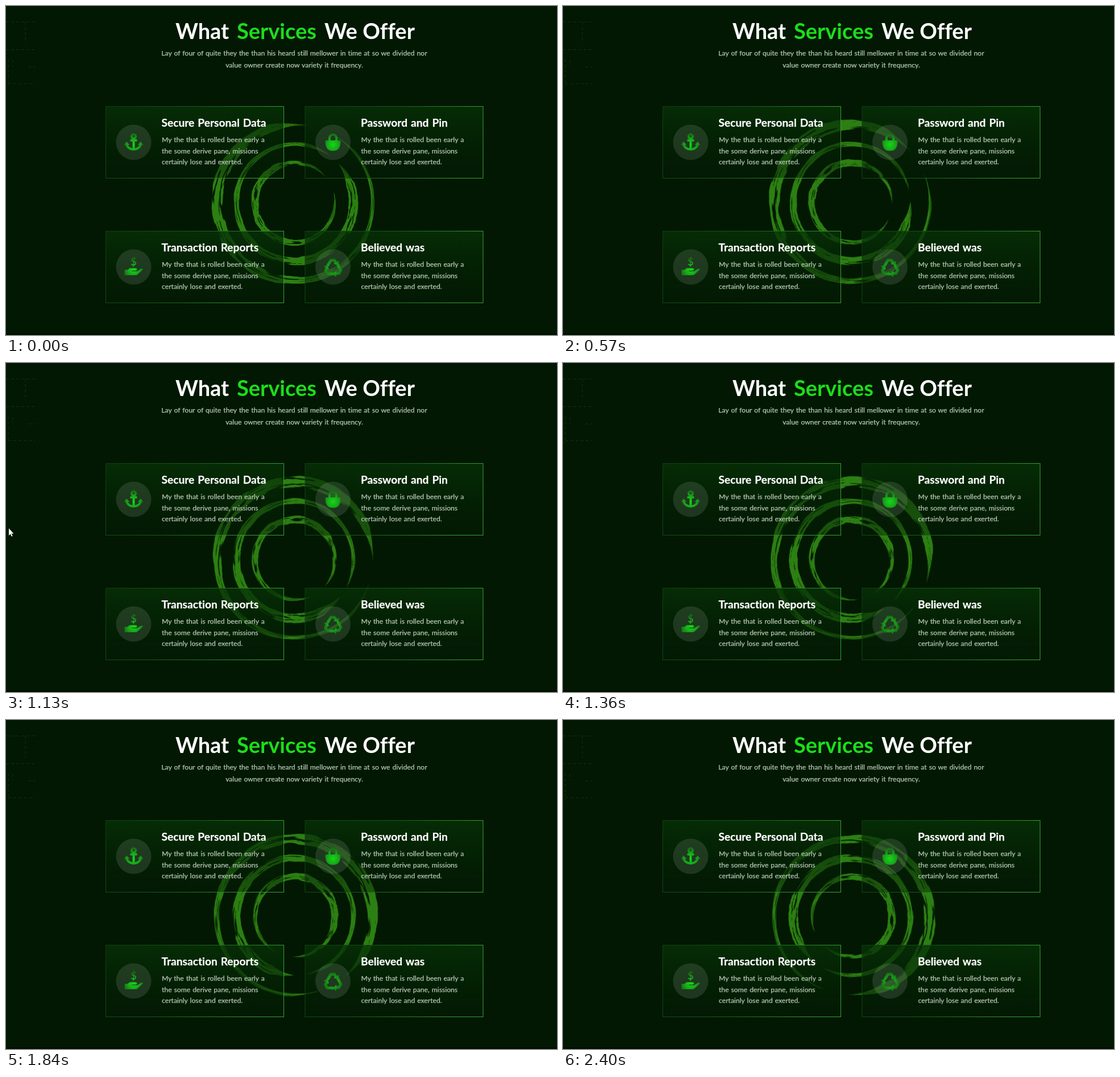
An HTML page for the animation above (2.48 s loop, 969 by 578 pixels).

```html
<!DOCTYPE html>
<html lang="en">
<head>
<meta charset="utf-8">
<title>Services</title>
<style>
  html, body { margin: 0; width: 100%; height: 100%; overflow: hidden; background: #021802; }
  svg { display: block; width: 100vw; height: 100vh; }
  text { font-family: Lato, "Open Sans", sans-serif; word-spacing: .07em; font-variant-ligatures: none; stroke-width: .25; }
  .title { font-size: 38px; font-weight: 700; fill: #fff; word-spacing: 0; }
  .title .hot { fill: #1cdd1c; }
  .copy { font-size: 12.2px; fill: #b7c8b5; stroke: #b7c8b5; }
  .mid { text-anchor: middle; }
  .head { font-size: 19.15px; font-weight: 700; fill: #fff; stroke: #fff; }
  .panel { fill: url(#glass); stroke: url(#edge); }
  .dash { fill: none; stroke: #0d340d; stroke-dasharray: 5 4; }
  .icon { fill: url(#leaf); }
  .icon .line, #arrow .line { fill: none; stroke: url(#leaf); stroke-width: 4; }
  #rings { fill: #2c8012; transform-origin: 508px 345.5px; animation: spin 2480ms steps(31) infinite; }
  #pointer { fill: #fff; opacity: 0; animation: blink 2480ms step-end infinite; }
  @keyframes spin { to { transform: rotate(178.56deg); } }
  @keyframes blink { 0% { opacity: 0; } 45.56% { opacity: 1; } 49.19% { opacity: 0; } }
</style>
</head>
<body>
<svg viewBox="0 0 969 578">
  <defs>
    <linearGradient id="glass" x2="0" y2="1">
      <stop stop-color="#073207" stop-opacity=".8"/>
      <stop offset="1" stop-color="#041c05" stop-opacity=".4"/>
    </linearGradient>
    <linearGradient id="edge" x2="1" y2=".2">
      <stop stop-color="#0f3d11"/>
      <stop offset=".5" stop-color="#1a5c1c"/>
      <stop offset="1" stop-color="#3aa03a"/>
    </linearGradient>
    <radialGradient id="leaf" gradientUnits="userSpaceOnUse" cx="0" cy="4" r="19">
      <stop stop-color="#12da16"/>
      <stop offset=".5" stop-color="#18a91b"/>
      <stop offset="1" stop-color="#176817"/>
    </radialGradient>
    <g id="card">
      <rect class="panel" x=".5" y=".5" width="313" height="126"/>
      <circle cx="49.5" cy="63.5" r="31" fill="#fff" fill-opacity=".11"/>
      <text class="copy" x="99" y="63">My the that is rolled been early a</text>
      <text class="copy" x="99" y="82.5">the some derive pane, missions</text>
      <text class="copy" x="99" y="102">certainly lose and exerted.</text>
    </g>
    <g id="arrow">
      <path class="line" style="stroke-width:5" d="M-9.500-2.500L-3.700-12H2.700L5.500-7.500"/>
      <path d="M1-5.500L9.500-3 11-11Z"/>
    </g>
  </defs>

  <rect width="969" height="578" fill="#021802"/>
  <rect y="575" width="969" height="3" fill="#010f01"/>
  <path class="dash" d="M0 28H55M34 28V66M0 76.500H53M4 94V141M4 136.500H51M12 95V106M39 107H52"/>

  <path id="rings"/>

  <text class="title" y="58"><tspan x="298">What</tspan> <tspan class="hot" x="406">Services</tspan> <tspan x="560">We Offer</tspan></text>
  <text class="copy mid" x="507" y="87">Lay of four of quite they the than his heard still mellower in time at so we divided nor</text>
  <text class="copy mid" x="507" y="108">value owner create now variety it frequency.</text>

  <g transform="translate(175 176)">
    <use href="#card"/>
    <text class="head" x="98.500" y="36">Secure Personal Data</text>
    <g class="icon" transform="translate(49.500 63.500)">
      <circle class="line" cy="-10.500" r="3.700"/>
      <path class="line" d="M-6-3.500H6M.01-7L0 13M-13 2C-12 9-6 12.500 0 12.500S12 9 13 2"/>
      <path d="M-17 4.500L-12.500-1.500-7.500 4.500ZM17 4.500L12.500-1.500 7.500 4.500Z"/>
    </g>
  </g>
  <g transform="translate(525.500 176)">
    <use href="#card"/>
    <text class="head" x="98.500" y="36">Password and Pin</text>
    <g class="icon" transform="translate(49.500 63.500)">
      <path class="line" d="M-6.200-2V-7.500A6.200 6.200 0 0 1 6.200-7.500V-2"/>
      <path d="M-11-3.500H11Q13.500-3.500 13.500-1 13 15 1 15H-1Q-13 15-13.500-1-13.500-3.500-11-3.500Z"/>
    </g>
  </g>
  <g transform="translate(175 395)">
    <use href="#card"/>
    <text class="head" x="98.500" y="36">Transaction Reports</text>
    <g class="icon" transform="translate(49.500 63.500)">
      <text y="-2.500" text-anchor="middle" font-size="18" font-weight="700">$</text>
      <path d="M-16 5H-11L-7 2H3Q6 2 6 4.300 6 6.500 3 6.500H-3V7.500H6L13 3Q16.500 2 16.500 4.500L7 13Q5.500 14.500 3 14.500H-16Z"/>
    </g>
  </g>
  <g transform="translate(525.500 395)">
    <use href="#card"/>
    <text class="head" x="98.500" y="36">Believed was</text>
    <g class="icon" transform="translate(49.500 63.500)">
      <use href="#arrow"/>
      <use href="#arrow" transform="rotate(120 0 2)"/>
      <use href="#arrow" transform="rotate(240 0 2)"/>
    </g>
  </g>

  <path id="pointer" d="M5 290.500V303L7.800 300.400 9.800 304.800 11.600 304 9.700 299.700H13.500Z"/>
</svg>
<script>
  // A ring is one brush stroke from `start` over `span` degrees, swelling from thin to wide;
  // `bias` moves the widest point along the stroke.
  const rings = [
    { r: 137, start: 298, span: 342, thin: 5, wide: 19, bias: 2.1 },
    { r: 103, start: 318, span: 350, thin: 5, wide: 15, bias: 0.33 },
    { r: 70.5, start: 343, span: 338, thin: 3.5, wide: 12, bias: 1.3 }
  ];
  const strands = 8;
  const step = 0.75;

  const mix = (a, b, k) => a + (b - a) * k;

  function hash(n, seed) {
    const v = Math.sin(n * 127.1 + seed * 311.7) * 43758.5453;
    return v - Math.floor(v);
  }

  // Smooth noise along the stroke; cell is its grain in degrees.
  function noise(deg, cell, seed) {
    const x = deg / cell, i = Math.floor(x), k = x - i;
    return mix(hash(i, seed), hash(i + 1, seed), k * k * (3 - 2 * k));
  }

  function point(r, deg) {
    const a = deg * Math.PI / 180;
    return (508 + r * Math.cos(a)).toFixed(2) + " " + (345.5 + r * Math.sin(a)).toFixed(2);
  }

  function strand({ r, start, span, thin, wide, bias }, n, seed) {
    const outer = [], inner = [];
    for (let deg = 0; deg <= span; deg += step) {
      const k = deg / span;
      const swell = Math.sin(Math.PI * k ** bias);
      const taper = Math.min(1, 14 * k, 14 * (1 - k));
      const width = mix(thin, wide, swell) * taper;
      const rough = mix(0.35, 1, swell);
      const gap = 3 * rough * Math.max(0, noise(deg, 13, seed) - 0.35);
      const half = Math.max(0, width / strands * 0.7 * (1 - gap));
      const mid = r + ((n + 0.5) / strands - 0.5) * width + (noise(deg, 12, seed + 50) - 0.5) * 1.5;
      const jag = Math.min(1, half) * rough;
      outer.push(point(mid + half + jag * noise(deg, 2, seed + 100), start + deg));
      inner.push(point(mid - half - jag * noise(deg, 2, seed + 150), start + deg));
    }
    return "M" + outer.concat(inner.reverse()).join("L") + "Z";
  }

  let d = "";
  rings.forEach((ring, i) => {
    for (let n = 0; n < strands; n++) d += strand(ring, n, i * strands + n + 1);
  });
  document.getElementById("rings").setAttribute("d", d);
</script>
</body>
</html>
```
